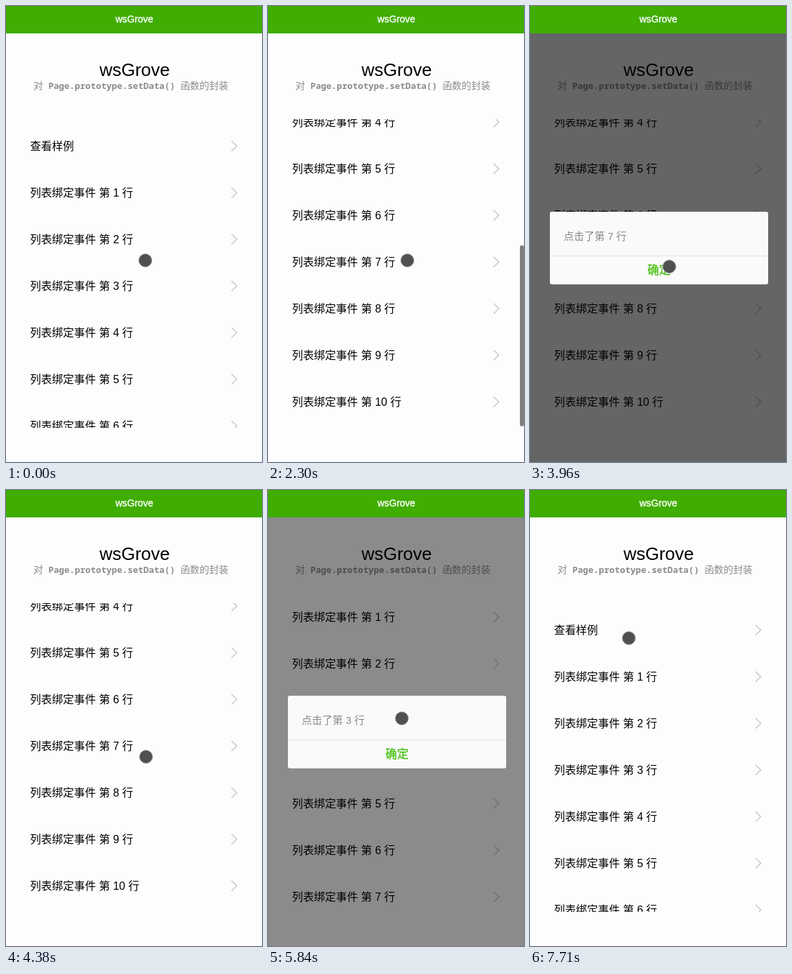
An HTML page for the animation above (8 s loop, 373x665 px).

```html
<!DOCTYPE html>
<html lang="zh-CN">
<head>
<meta charset="utf-8">
<title>wsGrove</title>
<style>
  html, body { margin: 0; width: 100%; height: 100%; overflow: hidden; background: #fdfdff; }
  svg { display: block; width: 100%; height: 100%; }
  text { font: 16px "Liberation Sans", "Noto Sans CJK SC", sans-serif; }
  .mid { text-anchor: middle; }
  #bar { font-size: 14px; fill: #fff; stroke: #fff; stroke-width: .4; }
  #title { font-size: 26px; }
  #sub { font: 500 14px "Noto Sans CJK SC", sans-serif; fill: #8b8b8b; }
  #sub tspan { font: 600 12.83px "Noto Sans Mono", monospace; }
  #message { font-size: 15px; fill: #888; }
  #ok { font-size: 17px; fill: #48c010; stroke: #48c010; stroke-width: .3; }
  .arrow { fill: none; stroke: #c8c8cb; stroke-width: 1.5; }
</style>
</head>
<body>
<svg viewBox="0 0 373 665">
  <clipPath id="view"><rect y="165" width="373" height="450"/></clipPath>
  <rect width="373" height="665" fill="#fdfdff"/>
  <rect width="373" height="40" fill="#40ad02"/>
  <text id="bar" class="mid" x="187" y="24">wsGrove</text>
  <text id="title" class="mid" x="187.5" y="102">wsGrove</text>
  <text id="sub" x="40" y="121">对<tspan> Page.prototype.setData() </tspan>函数的封装</text>
  <g clip-path="url(#view)"><g id="list">
    <rect id="hover" x="15" width="345" height="58" rx="3" fill="#e1f3fd"/>
  </g></g>
  <rect id="thumb" x="367" width="6" height="264" rx="3"/>
  <g id="modal">
    <rect id="mask" y="40" width="373" height="625"/>
    <rect x="29" y="300" width="318" height="106" rx="3" fill="#fafafc"/>
    <path d="M29 364.5H347" stroke="#e2e2e4"/>
    <text id="message" x="49" y="341"></text>
    <text id="ok" class="mid" x="188" y="391">确定</text>
  </g>
  <circle id="pointer" r="9.5" fill="#505050" stroke="#a0a0a0"/>
</svg>
<script>
const LOOP = 8000, TICK = 208, PITCH = 68, END = 307;
const $ = id => document.getElementById(id);
const set = (id, attrs) => {
  for (const name in attrs) $(id).setAttribute(name, attrs[name]);
};
const rowY = i => 204 + i * PITCH;

for (let i = 0; i <= 10; i++) {
  const label = i ? `列表绑定事件 第 ${i} 行` : '查看样例';
  $('list').insertAdjacentHTML('beforeend',
    `<text x="35" y="${rowY(i) + 6}">${label}</text>
     <path class="arrow" d="M328.5 ${rowY(i) - 7.2}l7.8 7.5l-7.8 7.5"/>`);
}

// Tracks of [tick, ...values]; each value holds until the next tick listed.
const scroll = [[0, 0], [5, 30], [6, 110], [7, 200], [8, 265], [9, 296], [11, END], [24, 87], [33, 0]];
const thumb = [[0, 0], [5, .5], [14, .25], [15, 0], [24, .5], [27, .25], [28, 0], [33, .5], [36, .25], [37, 0]];
const mask = [[0, 0], [17, .285], [18, .6], [21, 0], [28, .45], [29, .6], [31, 0]];
const pointer = [[0, 203, 371], [19, 203, 380], [20, 204, 389], [25, 199, 358], [26, 195, 333],
  [29, 192, 372], [30, 189, 394], [35, 174, 335], [36, 154, 256], [37, 144, 216]];
const at = (track, tick) => track.findLast(key => key[0] <= tick).slice(1);

function draw(now) {
  const tick = Math.floor(now % LOOP / TICK);
  const [top] = at(scroll, tick), [dim] = at(mask, tick), [x, y] = at(pointer, tick);
  const row = tick < 24 ? 7 : 3;
  set('list', { transform: `translate(0 ${-top})` });
  set('hover', { y: rowY(row) - 28 + 6, opacity: tick === 17 ? 1 : 0 });
  set('thumb', { y: 167 + top / END * 182, opacity: at(thumb, tick)[0] });
  set('modal', { visibility: dim ? 'visible' : 'hidden' });
  set('mask', { opacity: dim });
  set('pointer', { cx: x, cy: y });
  $('message').textContent = `点击了第 ${row} 行`;
}

const start = performance.now();
function loop() {
  draw(performance.now() - start);
  requestAnimationFrame(loop);
}
loop();
</script>
</body>
</html>
```
